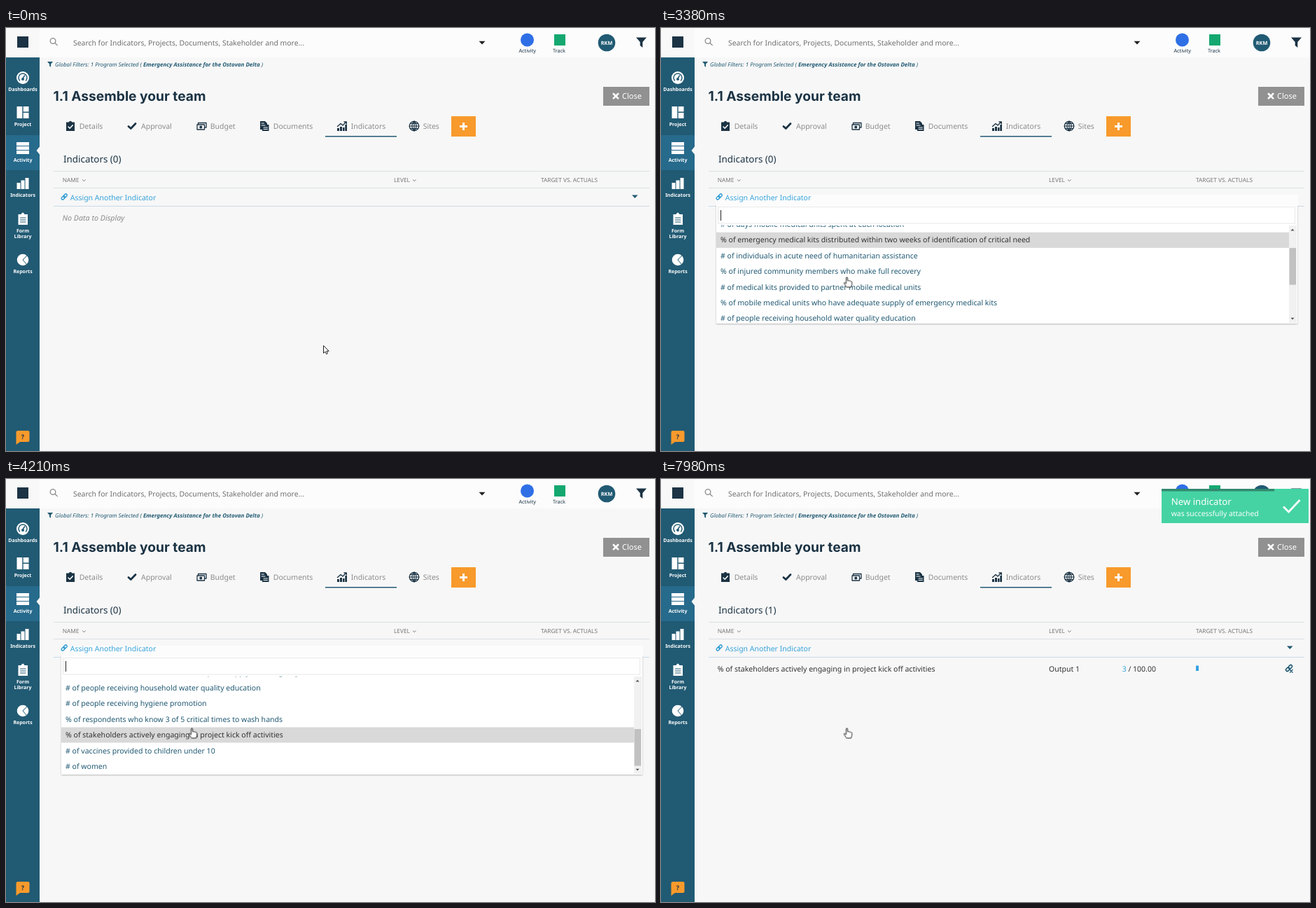
An HTML page that plays this animation: 927 px wide and 604 px high, repeating every 8 s.

```html
<!DOCTYPE html>
<html lang="en">
<head>
<meta charset="utf-8">
<title>Assign an indicator</title>
<style>
@property --pick { syntax: "<number>"; inherits: true; initial-value: 0; }
@property --scroll { syntax: "<length>"; inherits: true; initial-value: 0px; }

html, body { margin: 0; width: 100%; height: 100%; overflow: hidden; background: #f7f7f7; }
svg { display: block; }
#stage { width: 927px; height: 604px; }
text { font: 10.5px "Noto Sans", "Open Sans", sans-serif; text-rendering: geometricPrecision; white-space: pre; }

.ink { fill: #1b3344; }
.teal { fill: #215a73; }
.white { fill: #fff; }
.line { fill: none; stroke-linecap: round; stroke-linejoin: round; }
.title { font: 700 19.2px Inter, sans-serif; }
.sub { font-size: 13.4px; }
.filters { font-size: 8px; font-style: italic; }
.filters tspan { font-weight: 700; }
.nav text { font-size: 7px; font-weight: 700; text-anchor: middle; fill: #fff; }
.app { font-size: 7.3px; text-anchor: middle; }
.tabs text { fill: #8b8b8b; }
.head text { font-size: 8.3px; fill: #777; }
.row { font-size: 10.55px; }
.link { fill: #36a3d9; }
.empty { font-size: 10.7px; font-style: italic; fill: #8a8a8a; }

/* One loop is 8 s, so 1% is 80 ms */
.before, .after, .idle, .busy, .loading, .panel, .caret, .arrow, .hand { animation: 8s step-end infinite; }
.before { animation-name: before; }
.after { animation-name: after; }
.idle { animation-name: idle; }
.busy { animation-name: busy; }
.loading { animation-name: loading; }
.caret { animation-name: caret; }
.arrow { animation-name: arrow; }
.hand { animation-name: hand; }
.panel { animation: panel 8s step-end infinite, pick 8s step-end infinite, scroll 8s ease-in-out infinite; }
.runner { animation: runner 8s linear infinite; }
.toast { animation: toast 8s linear infinite; }
.timer { animation: timer 8s linear infinite; }
.pointer { animation: pointer 8s infinite; }

.list { transform: translateY(calc(-1 * var(--scroll))); }
.mark { transform: translateY(calc(var(--pick) * 22.4px)); }
.unmark { transform: translateY(calc(var(--pick) * -22.4px)); }
.thumb { transform: translateY(calc(var(--scroll) * .368)); }

@keyframes before { 0% { opacity: 1 } 83.125%, 100% { opacity: 0 } }
@keyframes after { 0% { opacity: 0 } 83.125%, 100% { opacity: 1 } }
@keyframes idle { 0% { opacity: 1 } 74.375% { opacity: 0 } 83.125%, 100% { opacity: 1 } }
@keyframes busy { 0% { opacity: 0 } 74.375% { opacity: 1 } 83.125%, 100% { opacity: 0 } }
@keyframes loading { 0% { opacity: 0 } 74.375% { opacity: 1 } 84.125%, 100% { opacity: 0 } }
@keyframes panel { 0% { opacity: 0 } 28% { opacity: 1 } 74.375%, 100% { opacity: 0 } }
@keyframes caret {
  0% { opacity: 1 } 32.75% { opacity: 0 } 40.375% { opacity: 1 } 46% { opacity: 0 }
  52.625% { opacity: 1 } 59.125% { opacity: 0 } 66% { opacity: 1 } 72.375%, 100% { opacity: 0 }
}
@keyframes pick {
  0% { --pick: 0 } 34.7% { --pick: 1 } 35.5% { --pick: 2 } 36.7% { --pick: 3 }
  42.4% { --pick: 5 } 44.9% { --pick: 6 } 46.5% { --pick: 8 } 49.25%, 100% { --pick: 11 }
}
@keyframes scroll {
  0%, 40.375% { --scroll: 0px }
  42.25%, 44.4375% { --scroll: 57.5px }
  46.3125%, 47.375% { --scroll: 115px }
  49.25%, 100% { --scroll: 173.9px }
}
@keyframes pointer {
  0%, 10.875% { transform: translate(453px, 453px); animation-timing-function: ease-in-out }
  19%, 32.875% { transform: translate(149px, 240px); animation-timing-function: cubic-bezier(.39, .575, .565, 1) }
  37.75%, 100% { transform: translate(265.5px, 355.5px) }
}
@keyframes arrow { 0% { opacity: 1 } 17.6%, 100% { opacity: 0 } }
@keyframes hand { 0% { opacity: 0 } 17.6%, 100% { opacity: 1 } }
@keyframes runner { 0%, 74.375% { transform: translateX(-219px) } 84.125%, 100% { transform: translateX(717px) } }
@keyframes toast { 0%, 74.375% { opacity: 0 } 76.5%, 100% { opacity: 1 } }
@keyframes timer { 0%, 74.375% { width: 0 } 100% { width: 162.6px } }
</style>
</head>
<body>
<svg id="stage" viewBox="0 0 927 604">
  <defs>
    <text id="rows" class="row" y="-7.4">
      <tspan x="85" dy="22.4"># of adolescents aged 13-19 who received medical kits</tspan>
      <tspan x="85" dy="22.4"># of adolescents aged 13-19 who underwent medical check-up in the reporting period</tspan>
      <tspan x="85" dy="22.4"># of days mobile medical units spent at each location</tspan>
      <tspan x="85" dy="22.4">% of emergency medical kits distributed within two weeks of identification of critical need</tspan>
      <tspan x="85" dy="22.4"># of individuals in acute need of humanitarian assistance</tspan>
      <tspan x="85" dy="22.4">% of injured community members who make full recovery</tspan>
      <tspan x="85" dy="22.4"># of medical kits provided to partner mobile medical units</tspan>
      <tspan x="85" dy="22.4">% of mobile medical units who have adequate supply of emergency medical kits</tspan>
      <tspan x="85" dy="22.4"># of people receiving household water quality education</tspan>
      <tspan x="85" dy="22.4"># of people receiving hygiene promotion</tspan>
      <tspan x="85" dy="22.4">% of respondents who know 3 of 5 critical times to wash hands</tspan>
      <tspan x="85" dy="22.4">% of stakeholders actively engaging in project kick off activities</tspan>
      <tspan x="85" dy="22.4"># of vaccines provided to children under 10</tspan>
      <tspan x="85" dy="22.4"># of women</tspan>
    </text>
    <path id="funnel" d="M0 0H15L9.3 6.5V14.5L5.7 11.5V6.5Z"/>
    <path id="sort" class="line" stroke="#777" d="M0 0L2 2L4 0"/>
    <filter id="shadow" x="-5%" y="-5%" width="110%" height="115%">
      <feDropShadow dx="0" dy="1" stdDeviation="1.2" flood-opacity=".25"/>
    </filter>
  </defs>

  <rect width="927" height="604" fill="#f7f7f7"/>
  <rect width="927" height="42" fill="#fcfcfc"/>

  <!-- Header -->
  <g class="line" stroke="#8a8a8a" stroke-width="1.3"><circle cx="67" cy="18.5" r="3.8"/><path d="M70 21.5L73.3 24.6"/></g>
  <text x="96" y="24.7" fill="#6f6f6f" style="font-size:10.4px">Search for Indicators, Projects, Documents, Stakeholder and more...</text>
  <path d="M675.5 18.7H684.5L680 23.5Z" fill="#222"/>
  <circle cx="744.5" cy="17" r="9.5" fill="#2f6fe6"/>
  <text class="app ink" x="744.7" y="35">Activity</text>
  <rect x="783" y="9" width="16" height="16" fill="#14a870"/>
  <text class="app ink" x="790" y="35">Track</text>
  <circle class="teal" cx="858" cy="21" r="12.3"/>
  <text x="858" y="24" class="white" text-anchor="middle" style="font-size:7.3px;font-weight:700">RKM</text>
  <use href="#funnel" class="ink" x="900" y="13.5"/>
  <use href="#funnel" class="teal" transform="translate(59 48) scale(.54)"/>
  <text class="filters teal" x="70" y="55">Global Filters: 1 Program Selected ( <tspan>Emergency Assistance for the Ostovan Delta</tspan> )</text>

  <g class="loading">
    <rect x="48" y="61.5" width="879" height="2" fill="#d3dce0"/>
    <rect class="runner" y="61.5" width="267" height="2" fill="#36a9e1"/>
  </g>

  <!-- Sidebar -->
  <rect width="48" height="42" fill="#f8f8f8"/>
  <rect x="16" y="12" width="16" height="16" class="ink"/>
  <rect class="teal" y="42" width="48" height="562"/>
  <rect y="153" width="48" height="50" fill="#266a8c"/>
  <path d="M48 169.5V180.5L43.5 175Z" fill="#f7f7f7"/>
  <g class="nav">
    <circle class="white" cx="24" cy="71" r="9"/>
    <path class="line" stroke="#215a73" stroke-width="1.5" d="M19.5 75A6 6 0 1 1 28.5 75M24 72L26.5 68"/>
    <circle class="teal" cx="24" cy="73" r="2"/>
    <text x="24" y="90">Dashboards</text>
    <path class="white" d="M15.5 112H23.3V129H15.5ZM24.7 112H32.5V119.5H24.7ZM24.7 121H32.5V129H24.7Z"/>
    <text x="24" y="140.3">Project</text>
    <path class="white" d="M15 163H33V168H15ZM15 169H33V174H15ZM15 175H33V180H15Z"/>
    <text x="24" y="190.8">Activity</text>
    <path class="white" d="M15.5 221H20.5V230H15.5ZM21.5 217.5H26.5V230H21.5ZM27.5 214H32.5V230H27.5Z"/>
    <text x="24" y="241.2">Indicators</text>
    <path class="white" d="M17.5 266H21.5Q24 261 26.5 266H31V281H17.5Z"/>
    <path class="line" stroke="#215a73" d="M20.5 271H28M20.5 274H28M20.5 277H28"/>
    <text x="24" y="291.5">Form</text><text x="24" y="300">Library</text>
    <circle class="white" cx="24" cy="331" r="8.3"/>
    <path class="line" stroke="#215a73" d="M30 325L24 331L29.5 337.5"/>
    <text x="24" y="350.3">Reports</text>
  </g>
  <path d="M17 575H31.5Q33.5 575 33.5 577V589Q33.5 591 31.5 591H20L14.5 595V577Q14.5 575 17 575Z" fill="#f89a2c"/>
  <text class="ink" x="24" y="586.5" text-anchor="middle" style="font-size:9px;font-weight:700">?</text>

  <!-- Page heading -->
  <text class="title ink" x="67.5" y="104">1.1 Assemble your team</text>
  <rect x="853" y="84" width="66" height="27" fill="#919191"/>
  <path class="line" stroke="#fff" stroke-width="2.6" d="M867.8 94L874.2 100.4M874.2 94L867.8 100.4"/>
  <text class="white" x="880" y="101.3" style="font-size:11px">Close</text>

  <!-- Tabs -->
  <g class="tabs">
    <path class="ink" d="M86 134.5H89.5Q92 131 94.5 134.5H98V147H86Z"/>
    <path class="line" stroke="#fff" stroke-width="1.5" d="M89 141L91.2 143.2L95.3 138.8"/>
    <text x="104.7" y="144.2">Details</text>
    <path class="line" stroke="#1b3344" stroke-width="2.8" d="M175 140.5L178.3 143.5L185 136.5"/>
    <text x="193" y="144.2">Approval</text>
    <path class="line" stroke="#1b3344" stroke-width="1.3" d="M274.5 137V135.5H286V142H284.5M273 138H283.5V145H273Z"/>
    <circle class="ink" cx="278.3" cy="141.5" r="2"/>
    <text x="291.7" y="144.2">Budget</text>
    <path class="ink" d="M363 133H370L373 136V138H375.5V147H366V145H363Z"/>
    <path class="line" stroke="#f7f7f7" d="M365 136H368.5M365 139H370M368 142H373.5M368 144.5H373.5"/>
    <text x="381.8" y="144.2">Documents</text>
    <path class="ink" d="M473 143H476V147H473ZM477 141H480V147H477ZM481 142H483.5V147H481ZM484.3 138H487V147H484.3Z"/>
    <path class="line" stroke="#1b3344" stroke-width="1.4" d="M473.5 140.5L478 136.5L481 139L486 134M483 134H486.3V137"/>
    <text x="492.7" y="144.2">Indicators</text>
    <path class="line" stroke="#1b3344" stroke-width="1.2" d="M576 140H590M577.5 136.5H588.5M577.5 143.5H588.5M583 133V147M583 133Q576.5 140 583 147Q589.5 140 583 133"/>
    <circle class="line" stroke="#1b3344" stroke-width="1.3" cx="583" cy="140" r="6.7"/>
    <text x="595.7" y="144.2">Sites</text>
    <rect class="teal" x="456" y="154" width="102" height="1.5"/>
    <rect x="636" y="126" width="35" height="29" fill="#f89a2c"/>
    <path stroke="#fff" stroke-width="3" d="M648 140.5H659M653.5 135V146"/>
  </g>

  <!-- Table -->
  <text class="sub ink" x="82" y="192.3">Indicators (<tspan class="digit"> </tspan></text>
  <rect x="152" y="178" width="20" height="18" fill="#f7f7f7"/>
  <g class="before"><rect x="80" y="178" width="100" height="19" fill="#f7f7f7"/><text class="sub ink" x="82" y="192.3">Indicators (0)</text></g>
  <g class="after"><rect x="80" y="178" width="100" height="19" fill="#f7f7f7"/><text class="sub ink" x="82" y="192.3">Indicators (1)</text></g>
  <path stroke="#dadee0" d="M68 204.5H919M68 228.5H919"/>
  <path stroke="#c9dce8" d="M68 254.5H919"/>
  <g class="head">
    <text x="80.7" y="219.8">NAME</text><use href="#sort" x="109.3" y="216.7"/>
    <text x="554" y="219.8">LEVEL</text><use href="#sort" x="581.3" y="216.7"/>
    <text x="764" y="219.8">TARGET VS. ACTUALS</text>
  </g>
  <path class="teal" d="M894 238.5H902.5L898.3 243Z"/>
  <path class="line busy" stroke="#999" d="M867.5 237.3L875 244.8M875 237.3L867.5 244.8"/>
  <text class="empty before" x="80.5" y="274.5">No Data to Display</text>
  <g class="after">
    <text class="row" x="80.7" y="274.5" fill="#333">% of stakeholders actively engaging in project kick off activities</text>
    <text x="554" y="274.5" fill="#333">Output 1</text>
    <text x="658.7" y="274.5" fill="#333"><tspan class="link">3</tspan> / 100.00</text>
    <rect x="764" y="266.5" width="4" height="7.5" fill="#36a3e0"/>
    <g class="line" stroke="#215a73" stroke-width="1.5">
      <rect x="-5.5" y="-2" width="6" height="4" rx="2" transform="translate(897 270) rotate(-45)"/>
      <rect x="-.5" y="-2" width="6" height="4" rx="2" transform="translate(897 270) rotate(-45)"/>
      <path d="M898.5 272.5L902 276M902 272.5L898.5 276"/>
    </g>
  </g>

  <!-- Dropdown -->
  <g class="panel">
    <rect x="79" y="253" width="830" height="169" fill="#fff" filter="url(#shadow)"/>
    <rect x="79" y="238" width="831" height="16" fill="#fcfcfc"/>
    <rect x="81.5" y="255.5" width="824" height="23.5" fill="#fff" stroke="#e8e8e8"/>
    <rect class="caret" x="85" y="260" width="1" height="15" fill="#222"/>
    <svg y="281.8" width="897" height="139.8">
      <g class="list">
        <use href="#rows" class="teal"/>
        <g class="mark">
          <svg width="897" height="22.4">
            <rect x="79" width="818" height="22.4" fill="#d9d9d9"/>
            <g class="unmark"><use href="#rows" fill="#333"/></g>
          </svg>
        </g>
      </g>
    </svg>
    <rect x="897" y="282" width="11" height="139" fill="#f1f1f1"/>
    <path d="M899.5 289.5H904.5L902 286.7ZM899.5 413.7H904.5L902 416.5Z" fill="#505050"/>
    <rect class="thumb" x="897.5" y="293" width="9.5" height="52.5" fill="#c1c1c1"/>
  </g>

  <g class="line link" style="fill:none" stroke="#2d9bd2" stroke-width="1.4" transform="translate(83.2 241) rotate(-45)">
    <rect x="-5" y="-1.8" width="5.8" height="3.6" rx="1.8"/><rect x="-.8" y="-1.8" width="5.8" height="3.6" rx="1.8"/>
  </g>
  <text class="link idle" x="91.7" y="246.3">Assign Another Indicator</text>
  <text class="row link busy" x="91.7" y="246.3">% of stakeholders actively engaging in project kick off activities</text>

  <!-- Toast -->
  <g class="toast">
    <rect x="715" y="14" width="210" height="49" fill="#45d3a4"/>
    <rect class="timer" x="715" y="14" width="0" height="3.5" fill="#32896f"/>
    <text class="white" x="728.7" y="37.3" style="font-size:13.2px">New indicator</text>
    <text class="white" x="728.7" y="53" style="font-size:10.4px">was successfully attached</text>
    <path fill="none" stroke="#fff" stroke-width="2.8" d="M889 39.5L896.5 47L912.5 30"/>
  </g>

  <!-- Pointer -->
  <g class="pointer" stroke="#222" stroke-width="1" stroke-linejoin="round">
    <path class="arrow" fill="#fff" d="M.5 .5V11.3L3 9L4.6 12.6L6.5 11.7L4.9 8.3H8.2Z"/>
    <path class="hand" fill="#fff" d="M-1 1Q0 -.3 1 1V5.2Q2.3 4.5 3.2 5.6Q4.5 5 5.3 6.2Q7.2 5.8 7.2 7.6V10.5L6 14.5H-.5L-4 9.3Q-4.4 7.4 -2.6 8.1L-1 9.6Z"/>
  </g>
</svg>
</body>
</html>
```
